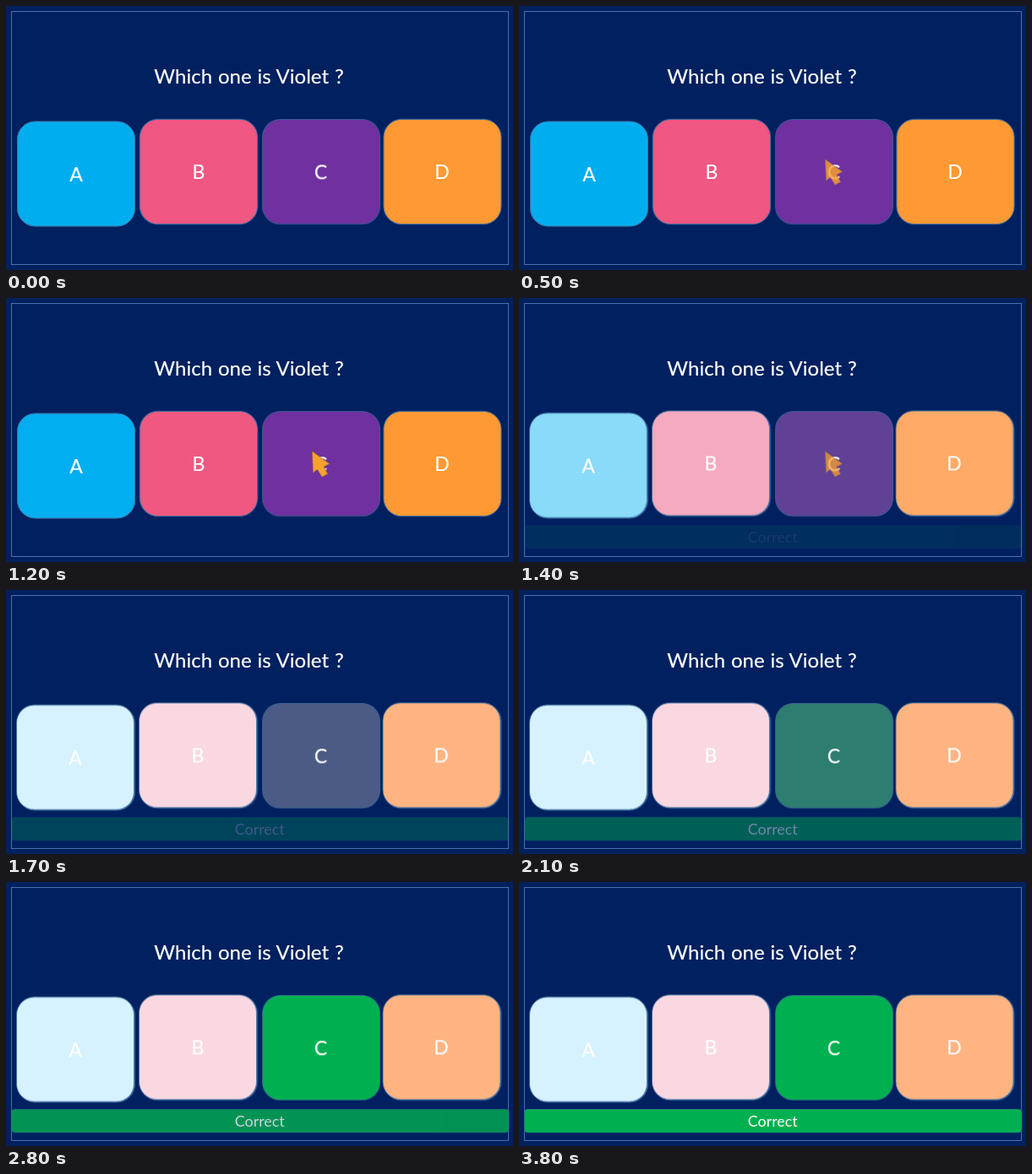
Write an HTML page that moves like this. It is 600x313 px and loops after 4000 ms.

```html
<!DOCTYPE html>
<html lang="en">
<head>
<meta charset="utf-8">
<title>Colour quiz</title>
<style>
  html, body { margin: 0; width: 100%; height: 100%; overflow: hidden; background: #002060; }
  svg { display: block; width: 600px; height: 313px; }
  text { font-family: Lato, "Open Sans", sans-serif; fill: #fff; stroke: #fff; stroke-width: .2; text-anchor: middle; }
  .title { font-size: 24px; word-spacing: .7px; }
  .letter { font-size: 23px; }
  .label { font-size: 17.9px; stroke: none; }
  .frame { fill: none; stroke: #4a70ae; }
  .edge { fill: #41719c; stroke: #2f62a0; }

  .face, .wrong, .right, .pulse, .bar, .pointer { animation: 4s linear infinite; }
  .wrong { animation-name: nudge; }
  .face { animation-name: lighten; stroke: #41719c; stroke-opacity: .85; }
  .right { animation-name: turn-green; stroke: #41719c; stroke-opacity: .75; }
  .pulse { animation-name: swell, dim; transform-origin: 373px 196.5px; }
  .bar { animation-name: reveal; }
  .pointer { animation-name: point; }

  @keyframes lighten {
    0%, 30% { fill: var(--from); animation-timing-function: cubic-bezier(.333, .667, .667, 1); }
    42.5%, 100% { fill: var(--to); }
  }
  @keyframes nudge {
    0%, 30% { transform: none; }
    35%, 100% { transform: translate(-1px, -.6px); }
  }
  @keyframes turn-green {
    0%, 30% { fill: #7030a0; }
    67.5%, 100% { fill: #00b050; }
  }
  @keyframes swell {
    0%, 17.5%, 30%, 100% { transform: scale(1); }
    23.75% { transform: scale(1.05); }
  }
  @keyframes dim {
    0%, 17.5%, 30%, 100% { opacity: 1; }
    20%, 27.5% { opacity: .5; }
  }
  @keyframes reveal {
    0%, 30% { opacity: 0; }
    80%, 100% { opacity: 1; }
  }
  @keyframes point {
    0%, 1.25% { opacity: 0; }
    15%, 32.5% { opacity: 1; }
    42.5%, 100% { opacity: 0; }
  }
</style>
</head>
<body>
<svg viewBox="0 0 600 313">
  <defs>
    <rect id="card" width="139" height="124" rx="21"/>
  </defs>
  <rect width="600" height="313" fill="#002060"/>
  <rect class="frame" x="6.5" y="6.5" width="588" height="300"/>
  <text class="title" x="287.5" y="92.3">Which one is Violet ?</text>

  <g transform="translate(13.5 137)" style="--from:#00aef0;--to:#d6f2fe">
    <use class="edge" href="#card"/>
    <g class="wrong">
      <use class="face" href="#card"/>
      <text class="letter" x="69.5" y="71">A</text>
    </g>
  </g>
  <g transform="translate(158.5 134.5)" style="--from:#f05782;--to:#fad8e1">
    <use class="edge" href="#card"/>
    <g class="wrong">
      <use class="face" href="#card"/>
      <text class="letter" x="69.5" y="70.5">B</text>
    </g>
  </g>
  <g transform="translate(447 134.5)" style="--from:#ff9933;--to:#ffb482">
    <use class="edge" href="#card"/>
    <g class="wrong">
      <use class="face" href="#card"/>
      <text class="letter" x="69" y="70.5">D</text>
    </g>
  </g>

  <g class="pulse">
    <use class="right" href="#card" x="303.5" y="134.5"/>
    <text class="letter" x="372.5" y="205">C</text>
  </g>

  <g class="bar">
    <rect x="6.5" y="269.5" width="588.5" height="27.5" rx="4" fill="#00b050" stroke="#2a7f80" stroke-width=".7"/>
    <text class="label" x="300.3" y="290">Correct</text>
  </g>

  <path class="pointer" d="M362.5 182 L363.5 207 L368.5 203 L374 212 L380.5 208.5 L376 200 L382.5 196.5 Z"
        fill="#f9a12e" stroke="#a9793f" stroke-width=".8" stroke-linejoin="round"/>
</svg>
</body>
</html>
```
